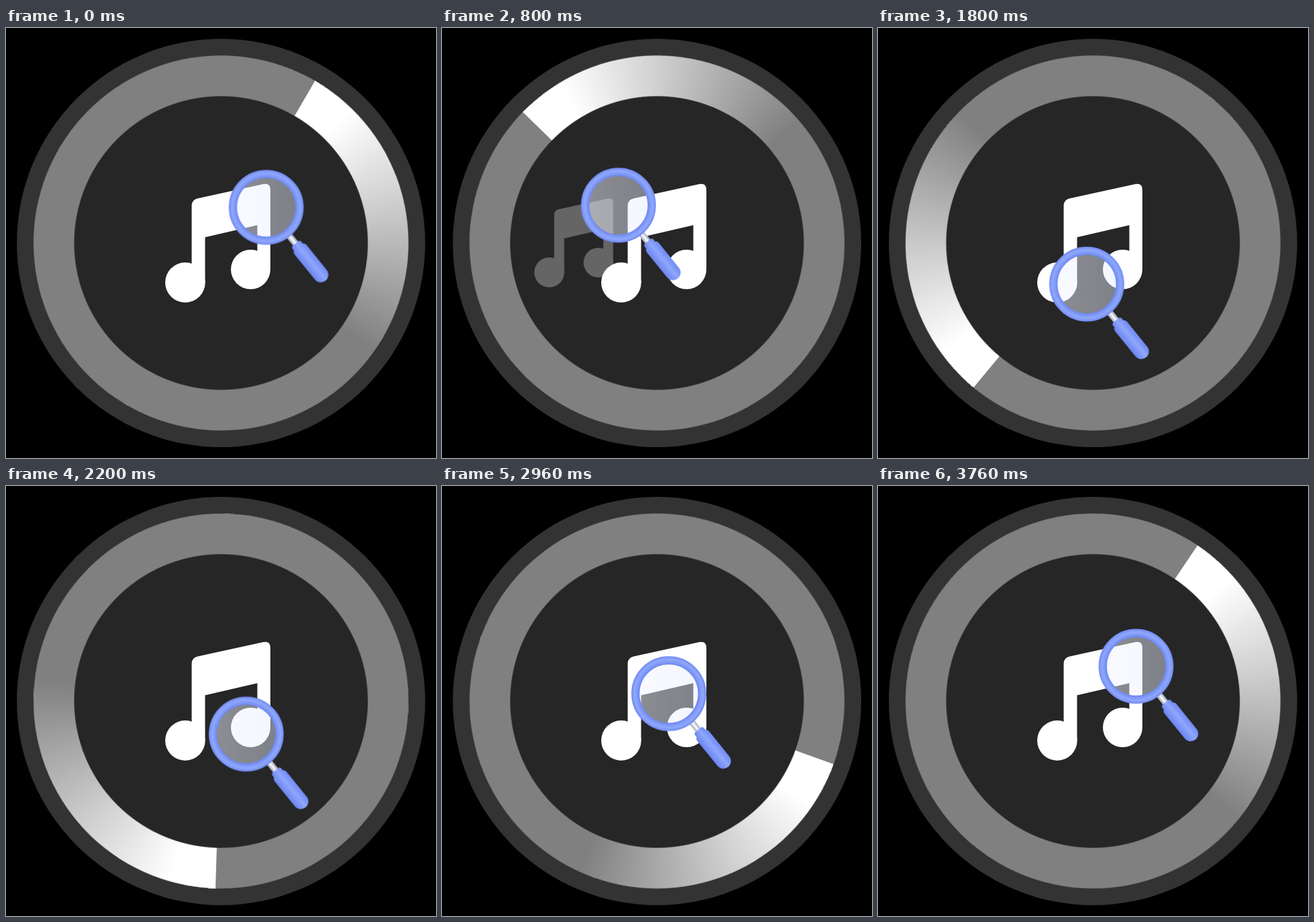
These frames come from a looping animation (675 px wide and 675 px high, 3.8 s). An HTML page without scripts:

```html
<!DOCTYPE html>
<html lang="en">
<head>
<meta charset="utf-8">
<title>Music search</title>
<style>
  html, body { margin: 0; width: 100%; height: 100%; overflow: hidden; background: #000; }
  .stage { position: relative; width: 675px; height: 675px; overflow: hidden; }
  .disc, .ring, svg { position: absolute; }
  .disc { inset: 17px; border-radius: 50%; background: radial-gradient(circle, #262626 262px, #333 263px); }
  .ring {
    inset: 43px;
    border-radius: 50%;
    background: conic-gradient(#fff 14deg, #ccc 48deg, #808080 95deg 360deg);
    -webkit-mask: radial-gradient(circle, transparent 230px, #000 231px);
    mask: radial-gradient(circle, transparent 230px, #000 231px);
    animation: spin 3.8s steps(95) infinite;
  }
  svg { inset: 0; }
  .echo { transform-origin: 332.5px 338px; animation: drift 3.8s linear infinite; }
  .lens { animation: search 3.8s linear infinite; }

  @keyframes spin {
    from { transform: rotate(30.2deg); }
    to { transform: rotate(-329.8deg); }
  }
  @keyframes drift {
    0%, 12% { opacity: 0; transform: none; }
    13% { opacity: .8; transform: none; }
    21.05% { opacity: .3; transform: translate(-125.5px, -.5px) scale(.75); }
    25%, 100% { opacity: 0; transform: translate(-150px, -.5px) scale(.7); }
  }
  @keyframes search {
    0% { transform: translate(408.5px, 281.5px); }
    2.63% { transform: translate(410.4px, 277px); }
    5.26% { transform: translate(400.8px, 272px); }
    10.53% { transform: translate(359.5px, 264px); }
    15.79% { transform: translate(309.8px, 263.5px); }
    18.42% { transform: translate(289.8px, 268.5px); }
    21.05% { transform: translate(277px, 278px); }
    26.32% { transform: translate(266.5px, 307.5px); }
    31.58% { transform: translate(264.5px, 340px); }
    36.84% { transform: translate(273px, 371px); }
    42.11% { transform: translate(296px, 394px); }
    47.37% { transform: translate(327.5px, 402px); }
    52.63% { transform: translate(355.5px, 398.7px); }
    57.89% { transform: translate(377px, 389.5px); }
    63.16% { transform: translate(389.5px, 376px); }
    68.42% { transform: translate(389px, 360px); }
    73.16% { transform: translate(372.5px, 342.5px); }
    77.89% { transform: translate(356px, 326px); }
    83.42% { transform: translate(356px, 312.3px); }
    88.95% { transform: translate(369px, 300.6px); }
    94.47% { transform: translate(388.4px, 290.5px); }
    98.95% { transform: translate(405px, 283px); }
    100% { transform: translate(408.5px, 281.5px); }
  }
</style>
</head>
<body>
<div class="stage">
  <div class="disc"></div>
  <div class="ring"></div>
  <svg width="675" height="675" viewBox="0 0 675 675">
    <defs>
      <g id="note" fill="#fff">
        <path d="M312.5 328.5 394.5 309.5V380H415V254Q415 243 404 245L301 267.5Q291.5 269.5 291.5 279V400H312.5Z"/>
        <circle cx="281.3" cy="399.5" r="31.4"/>
        <circle cx="384" cy="379" r="31"/>
      </g>
      <linearGradient id="glass">
        <stop stop-color="#f4f6ff" stop-opacity=".5"/>
        <stop offset="1" stop-color="#e8edff" stop-opacity=".46"/>
      </linearGradient>
      <radialGradient id="rim" gradientUnits="userSpaceOnUse" cx="0" cy="0" r="59">
        <stop offset=".77" stop-color="#6a84ea"/>
        <stop offset=".83" stop-color="#7d97f8"/>
        <stop offset=".91" stop-color="#90a8fd"/>
        <stop offset="1" stop-color="#6f89f0"/>
      </radialGradient>
      <linearGradient id="grip" x2="0" y2="1">
        <stop stop-color="#6f8af2"/>
        <stop offset=".45" stop-color="#90a7fd"/>
        <stop offset="1" stop-color="#6b85ef"/>
      </linearGradient>
    </defs>
    <use href="#note" class="echo"/>
    <use href="#note"/>
    <g class="lens">
      <g transform="rotate(51)">
        <rect x="56" y="-5" width="22" height="10" fill="#b9bfd0"/>
        <rect x="56" y="-2" width="22" height="4" fill="#eef0f6"/>
        <rect x="73" y="-9" width="16" height="18" rx="4" fill="url(#grip)"/>
        <path d="M86-12H136A12 12 0 0 1 136 12H86Q80 12 80 6V-6Q80-12 86-12Z" fill="url(#grip)"/>
      </g>
      <circle r="47" fill="url(#glass)"/>
      <circle r="52.3" fill="none" stroke="url(#rim)" stroke-width="13"/>
    </g>
  </svg>
</div>
</body>
</html>
```
